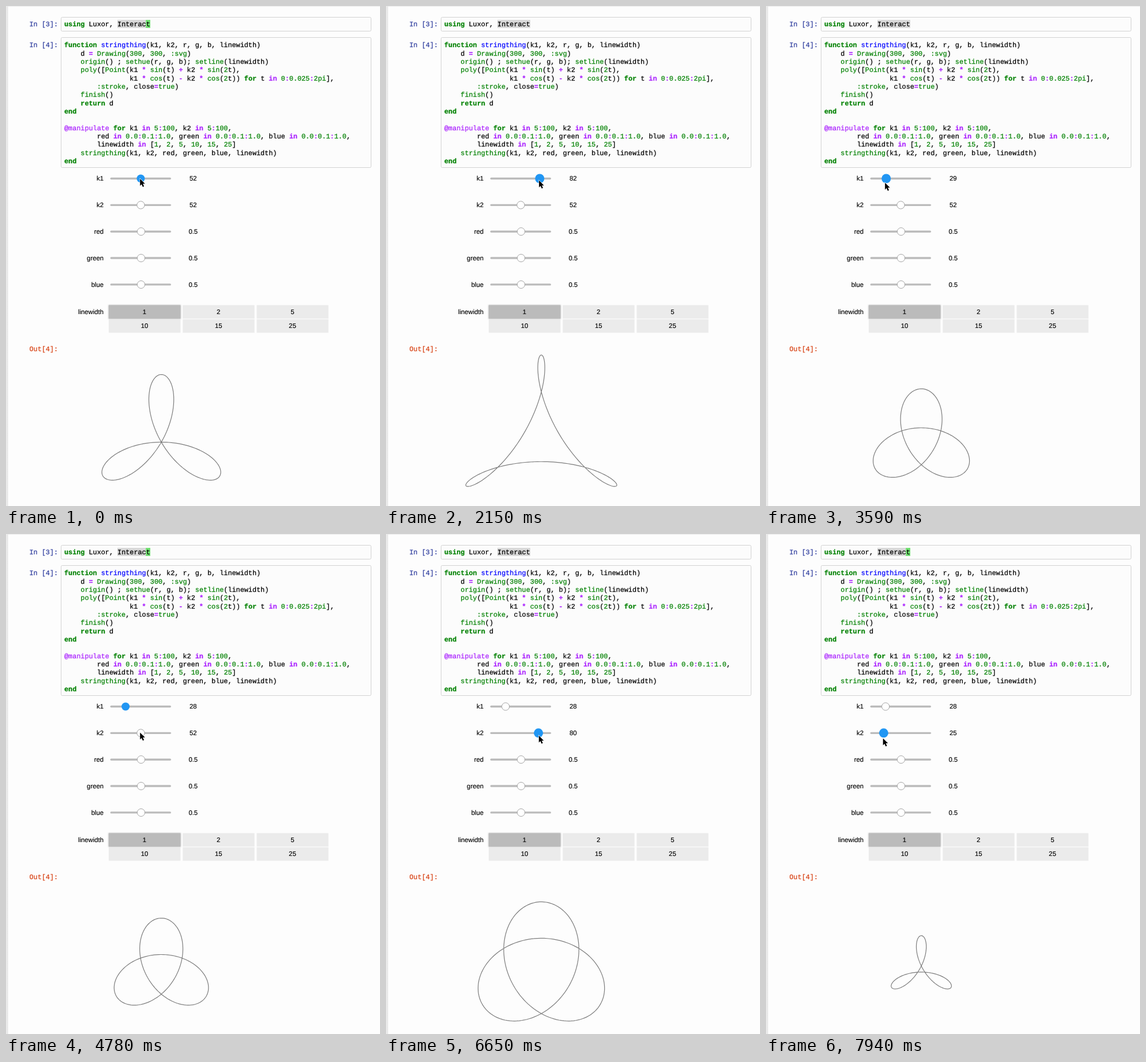
These frames come from a looping animation (648x865 px, 8000 ms). An HTML page:

```html
<!DOCTYPE html>
<html lang="en">
<head>
<meta charset="utf-8">
<title>Interactive curve notebook</title>
<style>
  html, body { margin: 0; width: 100%; height: 100%; overflow: hidden; background: #fdfdfd; }
  svg { display: block; width: 648px; height: 865px; }
  text { text-rendering: geometricPrecision; white-space: pre; color: #000; }
  text, tspan { fill: currentColor; stroke: currentColor; stroke-width: .25px; }
  .code { font: 11.8px "Liberation Mono", "Courier New", monospace; }
  .ui { font: 11.3px "Liberation Sans", Arial, sans-serif; stroke-width: .15px; }
  .kw { color: #008000; font-weight: bold; }
  .op { color: #aa22ff; font-weight: bold; }
  .meta { color: #aa22ff; }
  .num, .fn { color: #008000; }
  .def { color: #00f; }
  .in { color: #303f9f; }
  .out { color: #d84315; }
  .cell { fill: #fcfcfc; stroke: #d2d2d2; }
  .track { stroke: #bbb; stroke-width: 3.4; stroke-linecap: round; }
</style>
</head>
<body>
<svg id="stage" viewBox="0 0 648 865">
  <defs>
    <linearGradient id="edge">
      <stop offset="0" stop-color="#ededed"/>
      <stop offset=".55" stop-color="#e6e6e6"/>
      <stop offset="1" stop-color="#fdfdfd"/>
    </linearGradient>
    <filter id="soft" x="-5%" y="-20%" width="110%" height="140%"><feGaussianBlur stdDeviation=".8"/></filter>
  </defs>
</svg>
<script>
const CODE = `function stringthing(k1, k2, r, g, b, linewidth)
    d = Drawing(300, 300, :svg)
    origin() ; sethue(r, g, b); setline(linewidth)
    poly([Point(k1 * sin(t) + k2 * sin(2t),
                k1 * cos(t) - k2 * cos(2t)) for t in 0:0.025:2pi],
        :stroke, close=true)
    finish()
    return d
end

@manipulate for k1 in 5:100, k2 in 5:100,
        red in 0.0:0.1:1.0, green in 0.0:0.1:1.0, blue in 0.0:0.1:1.0,
        linewidth in [1, 2, 5, 10, 15, 25]
    stringthing(k1, k2, red, green, blue, linewidth)
end`;

const RULES = [
  ["def", /^stringthing(?=\(k1, k2, r, )/],
  ["kw", /^(using|function|for|return|end)\b/],
  ["num", /^(:[a-z]+|[\d.]+(pi)?|true\b)/],
  ["op", /^(in\b|[=*+:-])/],
  ["meta", /^@\w+/],
  ["fn", /^[A-Za-z]\w*(?=\()/],
  ["", /^(\w+|\s+|.)/]
];

const stage = document.getElementById("stage");

function add(tag, attrs, content, parent = stage) {
  const el = document.createElementNS("http://www.w3.org/2000/svg", tag);
  for (const name in attrs) el.setAttribute(name, attrs[name]);
  if (content !== undefined) el.textContent = content;
  parent.append(el);
  return el;
}

function addCode(line, y) {
  const text = add("text", { class: "code", x: 101, y });
  while (line) {
    const [cls, rule] = RULES.find(([, re]) => re.test(line));
    const token = line.match(rule)[0];
    add("tspan", { class: cls }, token, text);
    line = line.slice(token.length);
  }
}

function addLabel(content, x, y, anchor = "middle") {
  return add("text", { class: "ui", x, y, "text-anchor": anchor }, content);
}

// Page and code cells
add("rect", { width: 4.5, height: 865, fill: "url(#edge)" });
add("rect", { x: 3, width: 645, height: 1, fill: "#e9e9e9" });
add("rect", { class: "cell", x: 95.5, y: 19.5, width: 537, height: 24, rx: 2 });
add("rect", { class: "cell", x: 95.5, y: 54.5, width: 537, height: 225, rx: 2 });
add("rect", { x: 193, y: 24, width: 57, height: 14, fill: "#d8d8d8" });
const block = add("rect", { x: 242.3, y: 24, width: 7.7, height: 14, fill: "#70e070" });
add("text", { class: "code in", x: 40.5, y: 35.3 }, "In [3]:");
add("text", { class: "code in", x: 40.5, y: 71.3 }, "In [4]:");
add("text", { class: "code out", x: 40.5, y: 597.4 }, "Out[4]:");
addCode("using Luxor, Interact", 35.3);
CODE.split("\n").forEach((line, i) => addCode(line, 71.3 + i * 14.33));

// Sliders
const thumbX = k => 182 + (k - 5) * 1.095;
const sliders = ["k1", "k2", "red", "green", "blue"].map((name, i) => {
  const y = 298.5 + i * 45.85;
  addLabel(name, 169, y + 3.7, "end");
  add("line", { class: "track", x1: 182.3, x2: 284.3, y1: y, y2: y });
  return {
    thumb: add("circle", { cx: 234, cy: y, r: 6.6, fill: "#fff", stroke: "#a5a5a5" }),
    value: addLabel("0.5", 324.3, y + 3.7)
  };
});

function setSlider({ thumb, value }, k, active, radius) {
  const n = Math.round(k);
  thumb.setAttribute("cx", thumbX(n));
  thumb.setAttribute("r", active ? radius : 6.6);
  thumb.setAttribute("fill", active ? "#2196f3" : "#fff");
  thumb.setAttribute("stroke", active ? "none" : "#a5a5a5");
  value.textContent = n;
}

// Line width buttons
addLabel("linewidth", 169, 532.6, "end");
add("rect", { x: 177.5, y: 517.3, width: 125.3, height: 24, fill: "#bbb", filter: "url(#soft)" });
[1, 2, 5, 10, 15, 25].forEach((n, i) => {
  const x = 178 + (i % 3) * 128.2;
  const y = i < 3 ? 517.5 : 542;
  add("rect", { x, y, width: 124.3, height: 23.3, fill: i ? "#ebebeb" : "#bbb" });
  addLabel(n, x + 62, y + 15.2);
});

const curve = add("path", { fill: "none", stroke: "#7c7c7c", "stroke-width": 1.2 });
const pointer = add("path", {
  d: "M0 0V12L2.7 9.4L4.7 14L6.9 13L4.9 8.6H8.6Z",
  stroke: "#fff", "stroke-width": 1.2, "paint-order": "stroke"
});

function curvePath(k1, k2) {
  const points = [];
  for (let a = 0; a < 2 * Math.PI; a += 0.025) {
    const x = k1 * Math.sin(a) + k2 * Math.sin(2 * a);
    const y = k1 * Math.cos(a) - k2 * Math.cos(2 * a);
    points.push((269.1 + x * 1.125).toFixed(2) + " " + (754.5 + y * 1.125).toFixed(2));
  }
  return "M" + points.join("L") + "Z";
}

// Slider drags as turning points: time, value
const DRAG1 = [[1206, 51.4], [1442, 64], [1900, 82], [2390, 82], [2858, 50], [3330, 30], [3700, 28]];
const DRAG2 = [[5100, 52], [5604, 68], [5808, 68], [6752, 82], [6870, 69], [7106, 52], [7350, 29], [7696, 25]];

const STEP = 118;        // screen refresh
const LAG = 2 * STEP;    // the drawing trails the sliders
const LEAD = 100;        // the pointer runs ahead of them

const ramp = (t, from, to) => Math.min(1, Math.max(0, (t - from) / (to - from)));
const mix = (a, b, p) => a + (b - a) * p;

function along(drag, t) {
  return drag.slice(1).reduce((v, [time, value], i) =>
    v + (value - drag[i][1]) * ramp(t, drag[i][0], time), drag[0][1]);
}
const k1At = t => t < 900 ? 52 : along(DRAG1, t);
const k2At = t => along(DRAG2, t);

function draw(time) {
  const t = 26 + STEP * Math.floor((time - 26) / STEP);
  const onSecond = t >= 4980;
  const travel = ramp(t, 3700, 4640);

  block.style.opacity = Math.abs(Math.floor((t - 55) / 521) % 2);
  setSlider(sliders[0], k1At(t), !onSecond, 7 + ramp(t, 380, 610) - ramp(t, 3820, 4030));
  setSlider(sliders[1], k2At(t), onSecond, 8);
  curve.setAttribute("d", curvePath(Math.round(k1At(t - LAG)), Math.round(k2At(t - LAG))));

  const x = mix(thumbX(k1At(t + LEAD)), thumbX(k2At(t + LEAD)), travel) - 1.2;
  const y = 299 + 7 * ramp(t, 1100, 3700) + 37.5 * travel + 10 * ramp(t, 5200, 7900);
  pointer.setAttribute("transform", `translate(${x} ${y})`);
}

const start = performance.now();
function tick() {
  draw((performance.now() - start) % 8000);
  requestAnimationFrame(tick);
}
tick();
</script>
</body>
</html>
```
